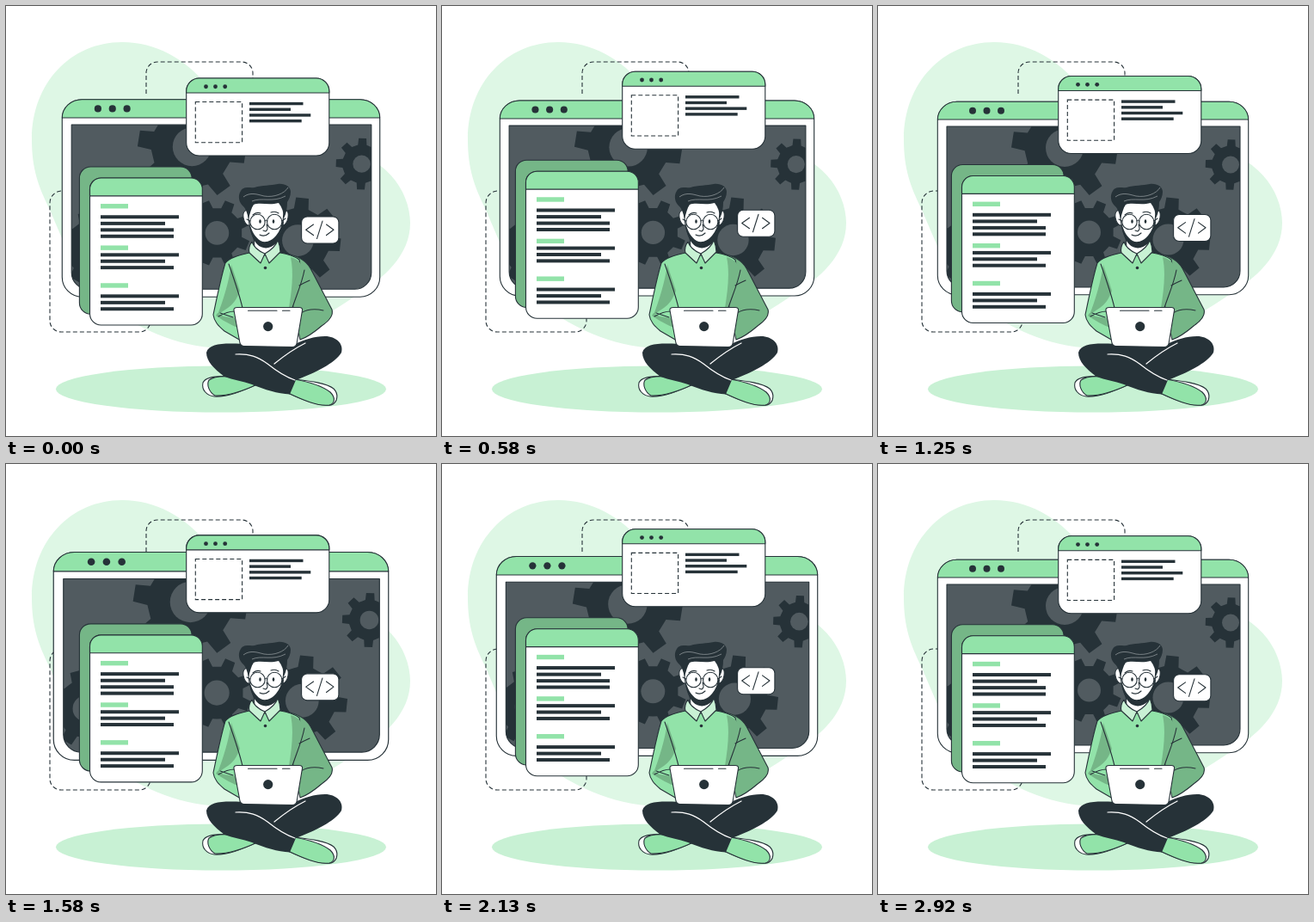
Write an HTML page that moves like this. It is 500 px wide and 500 px high and loops after 2960 ms.

```html
<!DOCTYPE html>
<html lang="en">
<head>
<meta charset="utf-8">
<title>Developer at work</title>
<style>
  html, body { margin: 0; width: 100%; height: 100%; overflow: hidden; background: #fff; }
  svg { display: block; width: 100vw; height: 100vh; }
  .line { stroke: #263238; stroke-width: 1.1; stroke-linecap: round; stroke-linejoin: round; }
  .open { fill: none; }
  .dash { fill: none; stroke: #263238; stroke-width: 1.1; stroke-dasharray: 5 3; }
  .white { fill: #fff; }
  .green { fill: #92e3a9; }
  .shade { fill: #75b687; }
  .pale { fill: #c8f1d4; }
  .dark { fill: #263238; }
  .screen { fill: #515b60; }
  .seam { fill: none; stroke: #fff; stroke-width: 1.2; stroke-linecap: round; }
</style>
</head>
<body>
<svg viewBox="0 0 500 500" xmlns="http://www.w3.org/2000/svg">
  <clipPath id="screenClip"><path d="M80 140H421V308A19 19 0 0 1 402 327H99A19 19 0 0 1 80 308Z"/></clipPath>

  <path fill="#def7e5" d="M30 155C30 90 75 42 135 42C175 42 207 62 230 88C260 135 320 158 380 164C440 171 470 215 470 252C470 290 440 316 405 338C355 372 300 399 250 398C195 396 150 372 120 350C80 315 70 280 50 235C38 210 30 190 30 155Z"/>
  <ellipse class="pale" cx="250" cy="445.5" rx="192" ry="27"/>
  <path class="dash" d="M163 102V78A13 13 0 0 1 176 65H274A13 13 0 0 1 287 78V90"/>
  <path class="dash" d="M72 215H65A14 14 0 0 0 51 229V366A13 13 0 0 0 64 379H155A13 13 0 0 0 168 366V358"/>

  <g id="monitor">
    <rect class="white line" x="69.3" y="111.2" width="361.4" height="224.5" rx="22.5"/>
    <path class="green line" d="M69.3 132A22.5 20.8 0 0 1 91.8 111.2H408.2A22.5 20.8 0 0 1 430.7 132Z"/>
    <g class="dark"><circle cx="110" cy="121.7" r="4"/><circle cx="126.5" cy="121.7" r="4"/><circle cx="143" cy="121.7" r="4"/></g>
    <path class="screen" d="M80 140H421V308A19 19 0 0 1 402 327H99A19 19 0 0 1 80 308Z"/>
    <g id="gears" clip-path="url(#screenClip)"></g>
    <path class="line open" d="M80 140H421V308A19 19 0 0 1 402 327H99A19 19 0 0 1 80 308Z"/>
  </g>

  <g class="floating">
    <rect class="shade line" x="85.4" y="187.4" width="130.7" height="171.2" rx="13"/>
    <rect class="white line" x="97.5" y="200.4" width="130.8" height="171" rx="13"/>
    <path class="green line" d="M97.5 221.3V213.4A13 13 0 0 1 110.5 200.4H215.3A13 13 0 0 1 228.3 213.4V221.3Z"/>
    <g id="docBars"></g>
  </g>

  <g class="floating">
    <rect class="white line" x="209.7" y="84.4" width="166.1" height="90" rx="15"/>
    <path class="green line" d="M209.7 101.4V99.4A15 15 0 0 1 224.7 84.4H360.8A15 15 0 0 1 375.8 99.4V101.4Z"/>
    <g class="dark"><circle cx="232.5" cy="94.2" r="2.4"/><circle cx="243.5" cy="94.2" r="2.4"/><circle cx="254.7" cy="94.2" r="2.4"/></g>
    <rect class="dash" x="220.3" y="112" width="54.3" height="47.2"/>
    <g id="cardBars"></g>
  </g>

  <g class="floating">
    <rect class="white line" x="343.6" y="245.4" width="43.3" height="31" rx="6.5"/>
    <path class="line open" d="M357.5 254.5L348.7 260.7L357.5 267M368 250.5L361.5 271M372.5 254.5L381 260.7L372.5 267"/>
  </g>

  <g id="man">
    <!-- feet and legs -->
    <path class="white line" d="M262 431C248 430 232 431 229 438C227 447 234 453 242 454C258 455 276 447 292 440Z"/>
    <path class="green line" d="M264 431C252 430 241 431 236 435C233 440 236 449 243 453C260 454 277 447 292 440Z"/>
    <path class="white line" d="M335 434C352 436 372 438 381 445C387 451 386 461 378 464C364 466 345 458 328 450Z"/>
    <path class="green line" d="M335 434C352 437 368 442 377 449C383 455 383 462 376 464C363 466 345 458 328 450Z"/>
    <path class="dark" d="M275 393C254 392 236 392 233 403C233 413 242 422 254 431C264 435 275 436 286 440C301 446 316 451 330 451.5L337 435C359 427 383 415 390 403C393 393 384 384 371 384C358 384 347 388 336 393Z"/>
    <path class="seam" d="M267 405C283 404 293 408 304 416C314 424 324 431 336 435M348 392C334 399 323 407 312 416"/>

    <!-- arms and torso -->
    <path class="shade line" d="M326 288C341 291 349 296 354 305L379 353C381 360 376 366 367 372C360 378 351 385 342 388L334 352Z"/>
    <path class="green line" d="M283 287C270 290 259 293 255 299C250 315 244 345 241 359C242 367 247 372 254 378L273 389L276 352H332C336 334 345 312 341 295C334 290 326 288 319 287Z"/>
    <path class="shade" d="M331 292C341 295 346 300 345 312C342 327 336 340 333 351H329C332 332 335 311 331 292ZM262 301L268 319L272 331C269 340 264 347 258 351L246 359C253 341 259 321 262 301ZM246 357L253 361L267 363L270 374C259 370 250 364 244 360Z"/>
    <path class="line open" d="M259 300C265 317 271 334 275 351M247 361C254 357 260 355 266 355M347 307C344 323 337 338 333 351M341 325C346 322 351 320 353 319M343 357C351 352 360 352 369 354M249 357L264 362"/>

    <!-- neck and collar -->
    <path class="white line" d="M288 268L289 281L301 290L314 280L315 266Z"/>
    <path class="pale line" d="M286 274C283 278 282 283 283 287L296 299L301 288C294 285 288 281 286 274ZM316 272C318 277 319 282 319 286L306 299L301 288C308 284 314 279 316 272Z"/>
    <circle class="dark" cx="301.5" cy="304.5" r="1.8"/>

    <!-- head -->
    <path class="white line" d="M284 239C278 235 275 240 276 246C277 252 280 256 284 255ZM321 239C327 235 329 240 328 246C327 252 324 256 320 255Z"/>
    <path class="white line" d="M282 231C281 249 284 263 289 271C294 278 299 281 303 280C309 278 314 273 317 267C321 258 324 246 323 229C308 224 293 225 282 231Z"/>
    <path class="dark" d="M283 252C286 263 290 269 296 273C302 276 309 273 314 267C318 262 321 255 323 248C323 260 320 270 314 276C307 283 298 283 292 277C286 271 284 262 283 252Z"/>
    <path class="dark" d="M282 247C280 240 279 236 276 233C271 229 269 221 273 215C277 209 283 212 289 211C298 208 308 209 316 207C324 206 331 210 331 216C331 221 329 225 327 228C327 235 326 241 323 247C323 240 321 234 317 229C306 232 295 228 288 231C285 235 284 241 282 247Z"/>
    <path fill="none" stroke="#9ba2a5" stroke-width=".7" d="M276 222C284 216 292 219 300 221C312 223 324 218 328 211M286 227C297 222 310 229 325 221"/>
    <path class="line open" stroke-width="1.8" d="M287 243Q291 239 296 241M308 240Q313 238 317 241"/>
    <path class="line open" d="M303 254C304 258 305 260 302 262L299 261M295 266Q301 269 306 264"/>
    <g class="line open"><circle cx="292.5" cy="251" r="8.7"/><circle cx="312.2" cy="251" r="8.7"/></g>
    <path class="line open" d="M301 250Q302.5 248 304 250M284 250L280 248M321 250L325 247"/>
    <g class="dark"><ellipse cx="295.5" cy="250.5" rx="1.3" ry="2.2"/><ellipse cx="311" cy="250.5" rx="1.3" ry="2.2"/></g>

    <!-- laptop -->
    <path class="white line" d="M269 350.5H341Q345 350.5 344.5 354L338 393Q337 396.5 333 396.5L277 395.5Q273 395.5 272 392L265 354Q264.5 350.5 269 350.5Z"/>
    <path class="line open" d="M281.5 354.2H315M321.5 354.2H330"/>
    <circle class="dark" cx="304.7" cy="372.6" r="5.6"/>
  </g>
</svg>
<script>
  const byId = id => document.getElementById(id);
  const LOOP = 2960, PERIOD = 1500, STEPS = 71;

  function gear(cx, cy, radius, hole, turn) {
    const points = [];
    for (let tooth = 0; tooth < 8; tooth++) {
      for (const [offset, scale] of [[-22.5, .74], [-13, .75], [-8.5, 1], [8.5, 1], [13, .75]]) {
        const angle = (turn + tooth * 45 + offset) * Math.PI / 180;
        const r = radius * scale;
        points.push((cx + r * Math.cos(angle)).toFixed(2) + ',' + (cy + r * Math.sin(angle)).toFixed(2));
      }
    }
    return `<polygon class="dark" points="${points.join(' ')}"/><circle class="screen" cx="${cx}" cy="${cy}" r="${hole}"/>`;
  }

  const bar = (kind, x, right, middle, height) =>
    `<rect class="${kind}" x="${x}" y="${middle - height / 2}" width="${right - x}" height="${height}"/>`;

  byId('gears').innerHTML = [
    [217, 165, 62, 22, 9], [245.5, 263, 38, 13.5, 22.5], [337.5, 271.5, 49, 18, 6],
    [410, 184.5, 29.5, 10, 2], [104, 280, 42, 14, 30]
  ].map(g => gear(...g)).join('');

  byId('docBars').innerHTML =
    [233.2, 281.6, 325.4].map(y => bar('green', 110, 142, y, 5.4)).join('') +
    [[201, 245.7], [185, 253.3], [195, 260.8], [195, 268.2], [201, 289.8], [185, 297.2],
     [195, 304.6], [201, 337.8], [185, 345.3], [195, 352.7]]
      .map(([right, y]) => bar('dark', 110, right, y, 4)).join('');

  byId('cardBars').innerHTML = [[345.5, 114], [331, 120.7], [354.3, 127.4], [343.7, 134.1]]
    .map(([right, y]) => bar('dark', 283, right, y, 3.4)).join('');

  // Two linear beats per period, followed by a rest.
  function beat(phase) {
    const keys = [[0, 0], [.1, 1], [.3, 0], [.4, 0], [.5, 1], [.6, 0], [1, 0]];
    const i = keys.findIndex(([end]) => phase < end);
    const [a, from] = keys[i - 1], [b, to] = keys[i];
    return 1 + .1 * (from + (to - from) * (phase - a) / (b - a));
  }

  const monitor = byId('monitor');
  const floating = document.querySelectorAll('.floating');

  function render(time) {
    // 24 pictures per second, each on a 60 Hz tick.
    const step = Math.min(STEPS - 1, Math.floor((time % LOOP + 5) * 24 / 1000));
    const clock = (Math.floor(step * 2.5) + 2) * 1000 / 60;
    const phase = clock % PERIOD / PERIOD;
    const lift = -10 * (1 - Math.abs(1 - 2 * phase));
    monitor.setAttribute('transform', `translate(250 223.45) scale(${beat(phase)}) translate(-250 -223.45)`);
    floating.forEach(part => part.setAttribute('transform', `translate(0 ${lift})`));
  }

  const start = performance.now();
  function tick() {
    render(performance.now() - start);
    requestAnimationFrame(tick);
  }
  tick();
</script>
</body>
</html>
```
